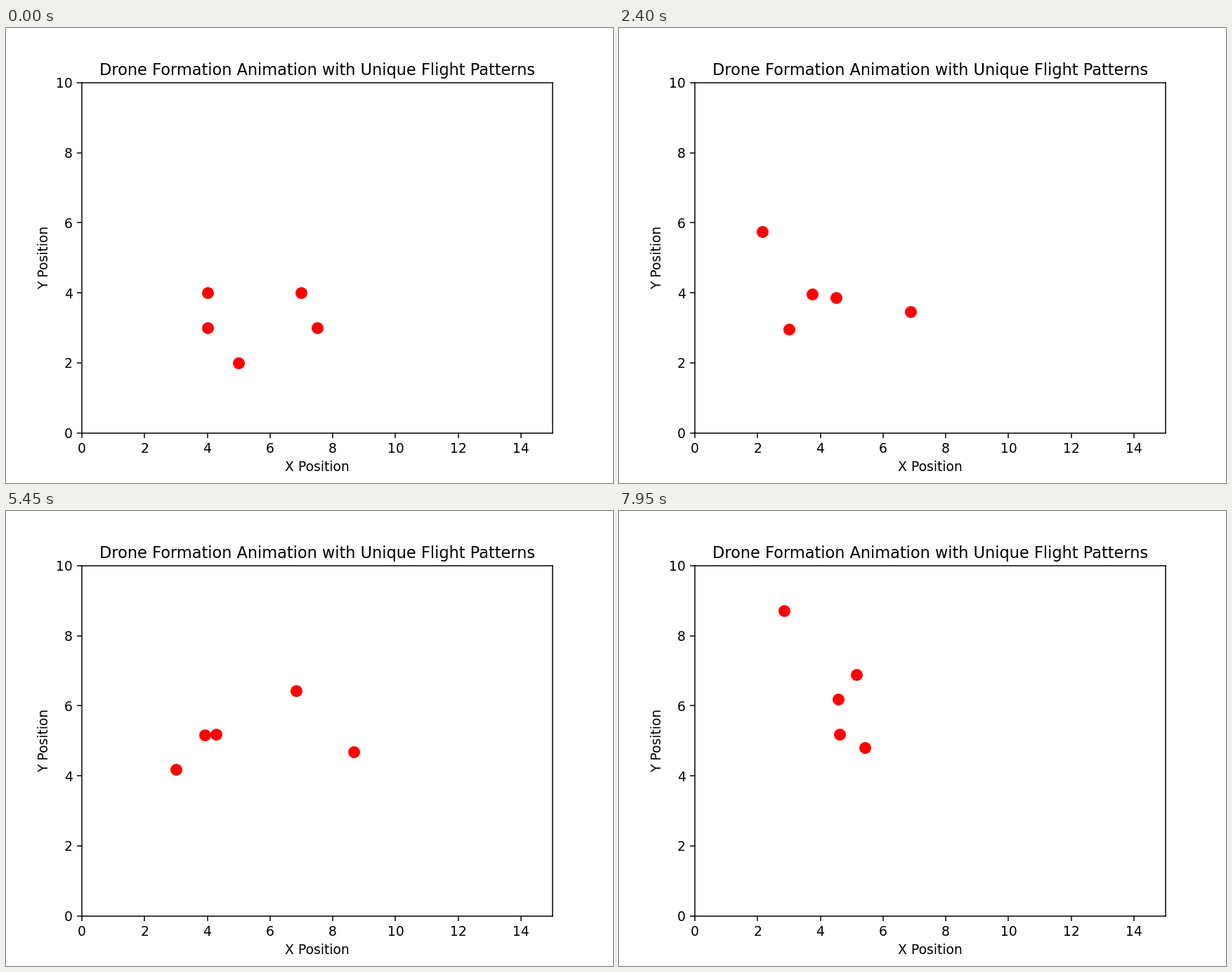
These frames come from a looping animation (864 by 648 pixels, 8000 ms). A matplotlib script:

```python
import numpy as np
import matplotlib.pyplot as plt
from matplotlib.animation import FuncAnimation

FRAMES = 160
INTERVAL = 50   # ms
CLIMB = 0.2     # shared upward drift per unit of time

fig, ax = plt.subplots(figsize=(6.4, 4.8), dpi=135)
ax.set_xlim(0, 15)
ax.set_ylim(0, 10)
ax.set_title("Drone Formation Animation with Unique Flight Patterns")
ax.set_xlabel("X Position")
ax.set_ylabel("Y Position")


def spiral(t):
    r = 1 + t / 30
    return 3 + r * np.cos(t / 2), 4 + r * np.sin(t / 2)


def figure_eight(t):
    return 7 + 2 * np.sin(t / 1.5), 4 + 1.5 * np.sin(t)


def zigzag(t):
    return 4 + 1.5 * np.sin(2 * t), 3


def circle(t):
    return 6 + 1.5 * np.cos(t / 1.5), 3 + 1.5 * np.sin(t / 1.5)


def wave(t):
    return 5 + 2 * np.sin(t), 2


patterns = [spiral, figure_eight, zigzag, circle, wave]
drones = [ax.plot([], [], "ro", markersize=8)[0] for _ in patterns]


def update(frame):
    t = 0.1 * frame
    for drone, pattern in zip(drones, patterns):
        x, y = pattern(t)
        drone.set_data([x], [y + CLIMB * t])
    return drones


ani = FuncAnimation(fig, update, frames=FRAMES, interval=INTERVAL,
                    init_func=lambda: update(0), repeat=True, repeat_delay=0)
plt.show()
```
